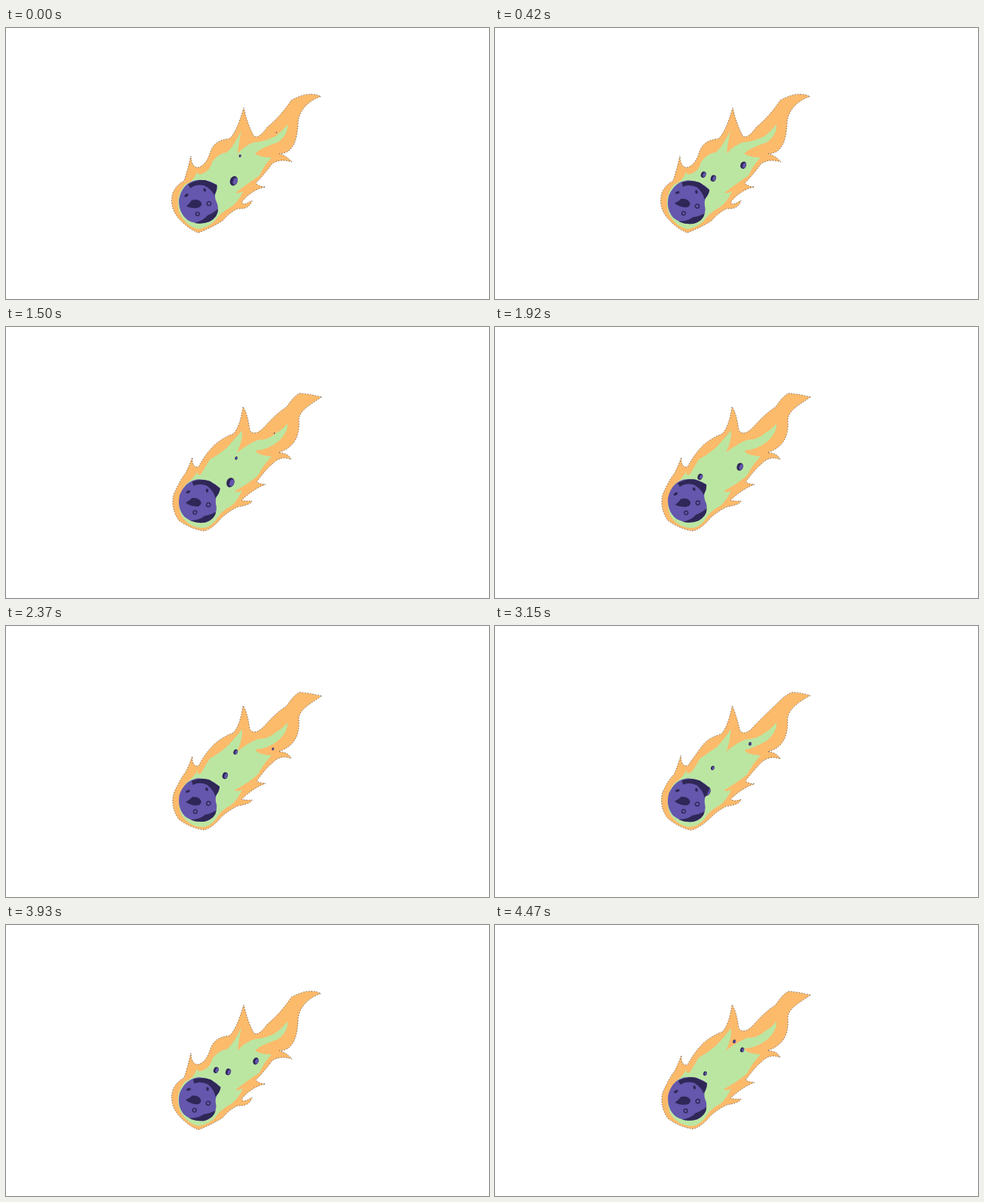
An HTML page with a canvas for the animation above (4.5 s loop, 640 by 360 pixels).

```html
<!DOCTYPE html>
<html lang="en">
<head>
<meta charset="utf-8">
<title>Comet</title>
<style>
  html, body { margin: 0; width: 640px; height: 360px; overflow: hidden; background: #fff; }
  canvas { display: block; }
</style>
</head>
<body>
<canvas id="stage" width="640" height="360"></canvas>
<script>
const ctx = document.getElementById('stage').getContext('2d');
const ORANGE = '#fcba6b', GREEN = '#bbe6a2', PURPLE = '#6457ad', DARK = '#2f2757';
const LOOP = 4500, STEP = 30;

// Each flame layer bends between two poses with the same segments.
const outer = [
  `M417 91 C400 97 388 110 387 126 C386 150 380 167 362 167 Q371 169 379 178
   Q364 173 353 180 Q341 196 331 206 Q335 211 344 211 Q327 214 313 230 Q312 238 326 229
   Q323 241 307 240 Q296 245 287 256 Q271 266 255 272 Q241 267 228 252 Q216 237 221 219
   Q226 208 236 203 Q241 188 245 170 Q246 187 256 185 Q266 181 271 164 Q276 149 296 147
   Q305 140 315 106 Q320 128 328 143 Q334 149 346 132 Q364 117 378 96 Q394 87 405 88
   Q412 88 417 91 Z`,
  `M418 93 C404 103 389 110 388 123 C390 150 378 161 361 167 Q374 167 378 176
   Q364 170 353 182 Q345 188 332 206 Q337 209 344 209 Q328 215 312 230 Q318 232 326 231
   Q325 236 307 239 Q295 245 286 253 Q273 269 262 271 Q244 268 229 257 Q218 241 222 223
   Q230 204 238 194 Q243 184 247 173 Q246 187 255 186 Q263 170 276 157 Q287 147 301 142
   Q310 133 314 106 Q320 114 323 137 Q330 147 344 131 Q358 115 372 106 Q381 92 389 88
   Q403 89 418 93 Z`
];
const inner = [
  `M373 128 Q374 142 360 152 Q336 160 330 167 Q338 172 352 172 Q342 182 336 196
   Q318 208 304 219 Q308 220 314 217 Q308 231 298 238 Q283 246 277 256 Q268 265 255 267
   Q240 264 231 248 Q222 226 237 208 Q249 204 253 191 Q254 197 263 192 Q271 188 273 178
   Q282 166 293 165 Q302 157 312 136 Q308 154 307 167 Q316 156 328 152 Q347 150 358 143
   Q366 137 373 128 Z`,
  `M373 128 Q374 140 361 152 Q347 163 331 164 Q331 170 352 172 Q341 183 334 197
   Q322 208 303 218 Q307 221 313 217 Q307 231 298 238 Q286 243 277 258 Q268 268 258 267
   Q241 265 232 250 Q224 230 238 209 Q249 201 254 191 Q252 198 258 196 Q264 186 270 176
   Q283 169 294 159 Q304 148 313 137 Q314 150 306 167 Q321 155 334 150 Q349 150 359 140
   Q366 137 373 128 Z`
];

const rock = new Path2D(`M279 208 Q280 214 277 220 Q276 226 280 233 Q284 247 272 256
  Q257 263 242 256 Q229 247 229 229 Q232 209 248 203 Q265 199 279 208 Z`);
const patches = new Path2D(`M241 208 Q252 201 264 202 L279 208 Q280 214 276 222
  Q272 214 262 209 Q251 207 244 213 Z
  M250 259 Q262 256 267 249 Q274 246 281 240 Q282 250 270 257 Q260 261 250 259 Z
  M239 237 Q244 233 246 229 Q255 226 259 232 Q260 238 253 239 Q245 240 239 237 Z`);

// Chips drift up the tail; "starts" are steps at which one leaves the rock.
const lanes = [
  { starts: [-3.6, 48.7, 112.4], speed: 2.45, offset: 347, drift: .02, size: 13, reach: 88 },
  { starts: [-14.7, 38, 102, 151.4], speed: 2.45, offset: 327.7, drift: -.035, size: 6, reach: 60 },
  { starts: [-38, 13.5, 78, 127.7], speed: 2.45, offset: 336.7, drift: -.05, size: 9, reach: 100 },
  { starts: [16, 68, 132], speed: 3, offset: 324, drift: -.1, size: 8.5, reach: 80 }
];

function blend([a, b], amount) {
  const target = b.match(/\d+/g);
  let i = 0;
  return new Path2D(a.replace(/\d+/g, n => +n + (target[i++] - n) * amount));
}

function fill(path, color) {
  ctx.fillStyle = color;
  ctx.fill(path);
}

function oval(x, y, rx, ry, angle, color) {
  ctx.beginPath();
  ctx.ellipse(x, y, rx, ry, angle, 0, 2 * Math.PI);
  ctx.fillStyle = color;
  ctx.fill();
}

function ring(x, y, r) {
  ctx.beginPath();
  ctx.arc(x, y, r, 0, 2 * Math.PI);
  ctx.stroke();
}

function drawFlame(step) {
  const p = step % 14;
  const bend = p <= 5 ? 0 : p < 8 ? (p - 5) / 3 : p <= 10 ? 1 : (14 - p) / 4;
  const edge = blend(outer, bend);
  fill(edge, ORANGE);
  ctx.strokeStyle = '#222';
  ctx.lineWidth = .6;
  ctx.setLineDash([1.5, 2]);
  ctx.stroke(edge);
  ctx.setLineDash([]);
  fill(blend(inner, bend), GREEN);
}

function drawChips(step) {
  for (const { starts, speed, offset, drift, size, reach } of lanes) {
    for (const start of starts) {
      const gone = (step - start) * speed;
      if (gone < -25 || gone > reach) continue;
      const along = 100 + gone, across = offset + drift * gone;
      const x = (5 * along + 4 * across) / 6.403;
      const y = (5 * across - 4 * along) / 6.403;
      const d = Math.max(1.6, size * (1 - (Math.max(0, gone) / reach) ** 2));
      oval(x, y, d * .39, d * .5, .35, DARK);
      oval(x + d * .14, y + d * .03, d * .22, d * .36, .35, PURPLE);
    }
  }
}

function drawRock(step) {
  const swing = 8 - 10 * Math.cos(2 * Math.PI * (step - 3.5) / 28);
  ctx.save();
  ctx.translate(255, 231);
  ctx.rotate(Math.min(16, Math.max(0, swing)) * Math.PI / 180);
  ctx.translate(-255, -231);
  fill(rock, PURPLE);
  fill(patches, DARK);
  oval(239, 222.5, 3, 1.7, -.6, DARK);
  oval(263, 215, 1.7, 2.5, -.4, DARK);
  ctx.strokeStyle = DARK;
  ctx.lineWidth = 1.4;
  ring(269, 233, 2.6);
  ring(254, 247, 2.4);
  ctx.restore();
}

function draw() {
  const step = Math.floor(performance.now() % LOOP / STEP);
  ctx.fillStyle = '#fff';
  ctx.fillRect(0, 0, 640, 360);
  drawFlame(step);
  drawChips(step);
  drawRock(step);
  requestAnimationFrame(draw);
}
draw();
</script>
</body>
</html>
```
